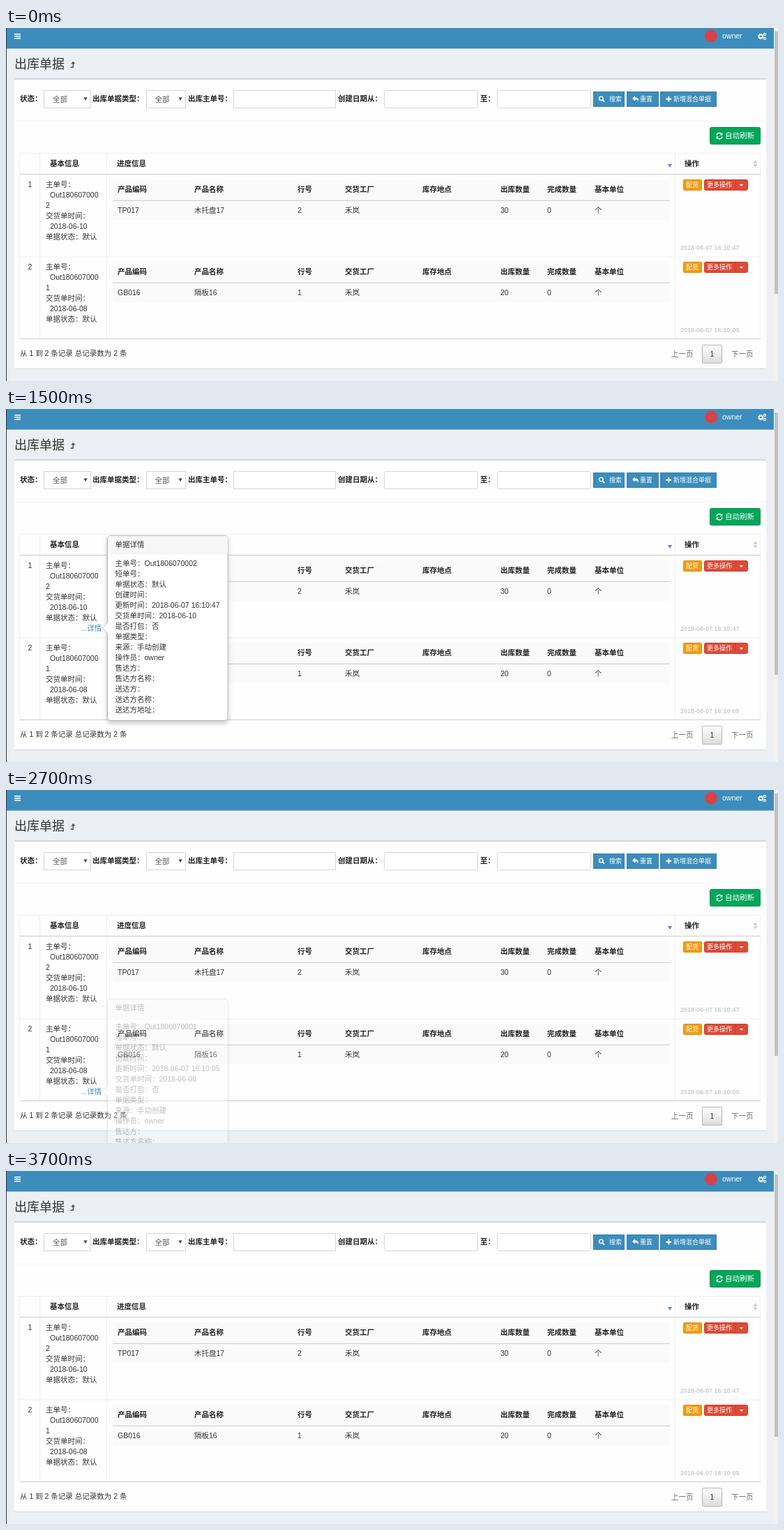
An HTML page that plays this animation: 1107x506 px, repeating every 3800 ms.

```html
<!DOCTYPE html>
<html lang="zh">
<head>
<meta charset="utf-8">
<title>出库单据</title>
<style>
html, body { margin: 0; height: 100%; overflow: hidden; background: #ecf0f5; }
svg { display: block; width: 1107px; height: 506px; }
text { font: 10.5px "Liberation Sans", "Noto Sans CJK SC", "Noto Sans CJK", sans-serif; white-space: pre; }
</style>
</head>
<body>
<svg viewBox="0 0 1107 506">
  <defs>
    <linearGradient id="page" x2="0" y2="1"><stop stop-color="#fff"/><stop offset="1" stop-color="#dcdcdc"/></linearGradient>
    <filter id="shadow" x="-10%" y="-10%" width="120%" height="120%">
      <feDropShadow dx="0" dy="3.5" stdDeviation="3" flood-opacity=".22"/>
    </filter>
  </defs>
</svg>
<script>
const svg = document.querySelector('svg');
let parent = svg;

function add(tag, attrs, content) {
  const el = document.createElementNS('http://www.w3.org/2000/svg', tag);
  for (const k in attrs) el.setAttribute(k, attrs[k]);
  if (content) el.textContent = content;
  return parent.appendChild(el);
}
const rect = (x, y, x2, y2, fill, more) => add('rect', { x, y, width: x2 - x, height: y2 - y, fill, ...more });
const frame = (x, y, x2, y2, fill, stroke, rx = 0) =>
  rect(x + .5, y + .5, x2 - .5, y2 - .5, fill, { stroke, rx });
const path = (d, fill, more) => add('path', { d, fill, ...more });
const line = (d, stroke, width = 1) => path(d, 'none', { stroke, 'stroke-width': width });
// y is the middle of the line of text
const text = (x, y, str, fill = '#333', size = 10.5, weight = 400) =>
  add('text', { x, y: y + size * .37, fill, style: `font-size:${size}px;font-weight:${weight}` }, str);
const bold = (x, y, str) => text(x, y, str, '#222', 10.5, 700);
const arrow = (x, y, w, h, fill) => path(`M${x - w} ${y}h${2 * w}l${-w} ${h}z`, fill);
function group(draw) {
  const outer = parent, g = add('g');
  parent = g;
  draw();
  parent = outer;
  return g;
}

function header() {
  rect(0, 0, 1101, 29.5, '#3c8dbc');
  const hover = rect(1068, 0, 1101, 29.5, '#367fa9');
  for (const y of [8, 11, 14]) rect(12, y, 21, y + 1.6, '#fff');
  add('circle', { cx: 1011, cy: 11.5, r: 9, fill: '#d8414a' });
  text(1027, 11.5, 'owner', '#fff');
  for (const [x, y, r] of [[1082.3, 12, 2.6], [1088, 9, 1.4], [1088, 15, 1.4]]) {
    add('circle', { cx: x, cy: y, r, fill: 'none', stroke: '#fff', 'stroke-width': r * .75 });
    add('circle', { cx: x, cy: y, r: r * 1.45, fill: 'none', stroke: '#fff', 'stroke-width': r * .4,
      'stroke-dasharray': r * .57 });
  }
  rect(0, 0, 1, 506, '#333');
  rect(1101, 0, 1107, 506, '#f1f1f1');
  rect(1102, 5, 1107, 381, '#c1c1c1');
  return hover;
}

function filters() {
  text(12, 51, '出库单据', '#333', 18);
  line('M92.5 56.3h3.8v-6', '#555', 1.5);
  path('M93.2 51.5l3.1-3.8l3.1 3.8z', '#555');

  rect(12, 73, 1090, 489, '#d5d9de', { rx: 2 });
  rect(12, 72, 1090, 488, '#d2d6de', { rx: 2 });
  rect(12, 74, 1090, 488, '#fefefe');
  line('M12 133.5H1090', '#f4f4f4');

  for (const [x, str] of [[20, '状态：'], [124, '出库单据类型：'], [261, '出库主单号：'], [476, '创建日期从：'], [680, '至：']])
    bold(x, 101, str);
  for (const [x, x2, r] of [[54, 122, 0], [201, 258, 0], [326, 473, 0], [542, 677, 2], [704, 839, 2]])
    frame(x, 89, x2, 115, '#fff', '#d2d6de', r);
  for (const [x, a] of [[67, 114], [213.5, 250]]) {
    text(x, 102, '全部', '#555');
    arrow(a, 99.5, 2.7, 4.5, '#444');
  }
  for (const [x, x2, tx, str] of [[842, 887, 865, '搜索'], [890, 936, 909, '重置'], [938, 1019, 957, '新增混合单据']]) {
    frame(x, 91, x2, 113, '#3c8dbc', '#367fa9');
    text(tx, 101.5, str, '#fff', 9);
  }
  add('circle', { cx: 853.3, cy: 101, r: 2.8, fill: 'none', stroke: '#fff', 'stroke-width': 1.4 });
  line('M855.3 103l2.7 2.8', '#fff', 1.7);
  path('M898 101l4-3.7v2.2c4.5 0 6.3 2.5 3.8 6.5c.4-2.7-.8-3.5-3.8-3.5v2.2z', '#fff');
  line('M946.5 101.7h7.6M950.3 98v7.4', '#fff', 2);

  frame(1009, 142, 1082, 167, '#00a65a', '#008d4c', 2);
  line('M1019 153.7a4 4 0 0 1 7-1.8M1027 155.7a4 4 0 0 1-7 1.8', '#fff', 1.5);
  path('M1027.4 150v3.8h-3.8zM1018.6 159.4v-3.8h3.8z', '#fff');
  text(1031, 154.5, '自动刷新', '#fff');
}

const columns = [160, 270, 418, 486, 597, 709, 776, 844];
const titles = ['产品编码', '产品名称', '行号', '交货工厂', '库存地点', '出库数量', '完成数量', '基本单位'];
const orders = [
  { id: 'Out1806070002', due: '2018-06-10', made: '2018-06-07 16:10:47', cells: ['TP017', '木托盘17', '2', '禾岚', '', '30', '0', '个'] },
  { id: 'Out1806070001', due: '2018-06-08', made: '2018-06-07 16:10:05', cells: ['GB016', '隔板16', '1', '禾岚', '', '20', '0', '个'] }
];
const rowHeight = 118;

function table() {
  for (const x of [20, 49, 145, 960, 1082]) line(`M${x - .5} 179V446`, '#f0f0f0');
  line('M20 179.5H1082M20 328H1082', '#f0f0f0');
  line('M20 209.5H1082M20 445.5H1082', '#d8d8d8', 1.3);
  bold(63, 194, '基本信息');
  bold(159, 194, '进度信息');
  bold(973, 194, '操作');
  arrow(952, 195, 3.2, 5, '#7080d8');
  arrow(1074.5, 195.3, 3, 4.5, '#ccc');
  arrow(1074.5, 193.8, 3, -4.5, '#ccc');
  orders.forEach(row);

  text(20, 466, '从 1 到 2 条记录 总记录数为 2 条');
  text(954, 467, '上一页', '#666');
  frame(998, 454, 1027, 481, 'url(#page)', '#b4b4b4', 1);
  text(1009.6, 467, '1');
  text(1040, 467, '下一页', '#666');
}

function row(order, i) {
  const y = 224 + i * rowHeight;
  text(31.5, y, String(i + 1));
  [['主单号：', 57], [order.id.slice(0, 12), 63], [order.id.slice(12), 57], ['交货单时间：', 57], [order.due, 63], ['单据状态：默认', 57]]
    .forEach(([str, x], n) => text(x, y + 15 * n, str));

  rect(153, y - 7, 952, y + 51, '#fafafa');
  line(`M153 ${y + 23.3}H952`, '#d2d2d2', 1.3);
  columns.forEach((x, n) => {
    bold(x, y + 7.3, titles[n]);
    text(x, y + 37, order.cells[n]);
  });

  frame(971, y - 7, 998, y + 9, '#f39c12', '#e08e0b', 1);
  text(975, y + .5, '配货', '#fff', 9);
  frame(1001, y - 7, 1064, y + 9, '#dd4b39', '#d73925', 2);
  line(`M1046 ${y - 7}v16`, '#d73925');
  text(1005, y + .5, '更多操作', '#fff', 9);
  arrow(1054.5, y, 2.8, 3, '#fff');
  text(967, y + 90.5, order.made, '#ccc', 9, 700);
}

function popover(order, i) {
  const y = 181 + i * rowHeight;
  frame(145, y, 318.5, y + 266, '#fff', '#bbb', 4.5).setAttribute('filter', 'url(#shadow)');
  path(`M146 ${y + 26}v-20q0-5 5-5h162q5 0 5 5v20z`, '#f7f7f7');
  line(`M146 ${y + 26}H318`, '#ebebeb');
  path(`M146 ${y + 125}l-7 8l7 8z`, '#fff');
  line(`M145.5 ${y + 125}l-7 8l7 8`, '#c4c4c4');
  text(156.5, y + 13, '单据详情');
  [
    '主单号：' + order.id, '短单号：', '单据状态：默认', '创建时间：', '更新时间：' + order.made,
    '交货单时间：' + order.due, '是否打包：否', '单据类型：', '来源：手动创建', '操作员：owner',
    '售达方：', '售达方名称：', '送达方：', '送达方名称：', '送达方地址：'
  ].forEach((str, n) => text(156.5, y + 40 + 15 * n, str));
}

const gearHover = header();
filters();
table();
const links = orders.map((o, i) => text(107.5, 314 + i * rowHeight, '...详情', '#3c8dbc'));
const popovers = orders.map((o, i) => group(() => popover(o, i)));

// Times in ms: hovered spans of each link, open and close of each popover
const hovers = [[[200, 400], [700, 2100]], [[400, 700], [2100, 2300], [2500, 3300]]];
const opens = [[1300, 1800], [2700, 3000]];
const fades = [[200, 100], [200, 170]];
const clamp = v => Math.max(0, Math.min(1, v));
const show = (el, on) => el.setAttribute('visibility', on ? 'visible' : 'hidden');
const start = performance.now();

function draw() {
  const t = Math.floor((performance.now() - start) % 3800 / 100) * 100;
  links.forEach((el, i) => show(el, hovers[i].some(([a, b]) => t >= a && t < b)));
  popovers.forEach((el, i) => {
    const [open, close] = opens[i], [fadeIn, fadeOut] = fades[i];
    const alpha = t < open ? 0 : t < close ? clamp((t - open + 60) / fadeIn) : clamp(1 - (t - close + 50) / fadeOut);
    el.setAttribute('opacity', alpha);
  });
  show(gearHover, t >= 3500 && t < 3700);
  requestAnimationFrame(draw);
}
draw();
</script>
</body>
</html>
```
